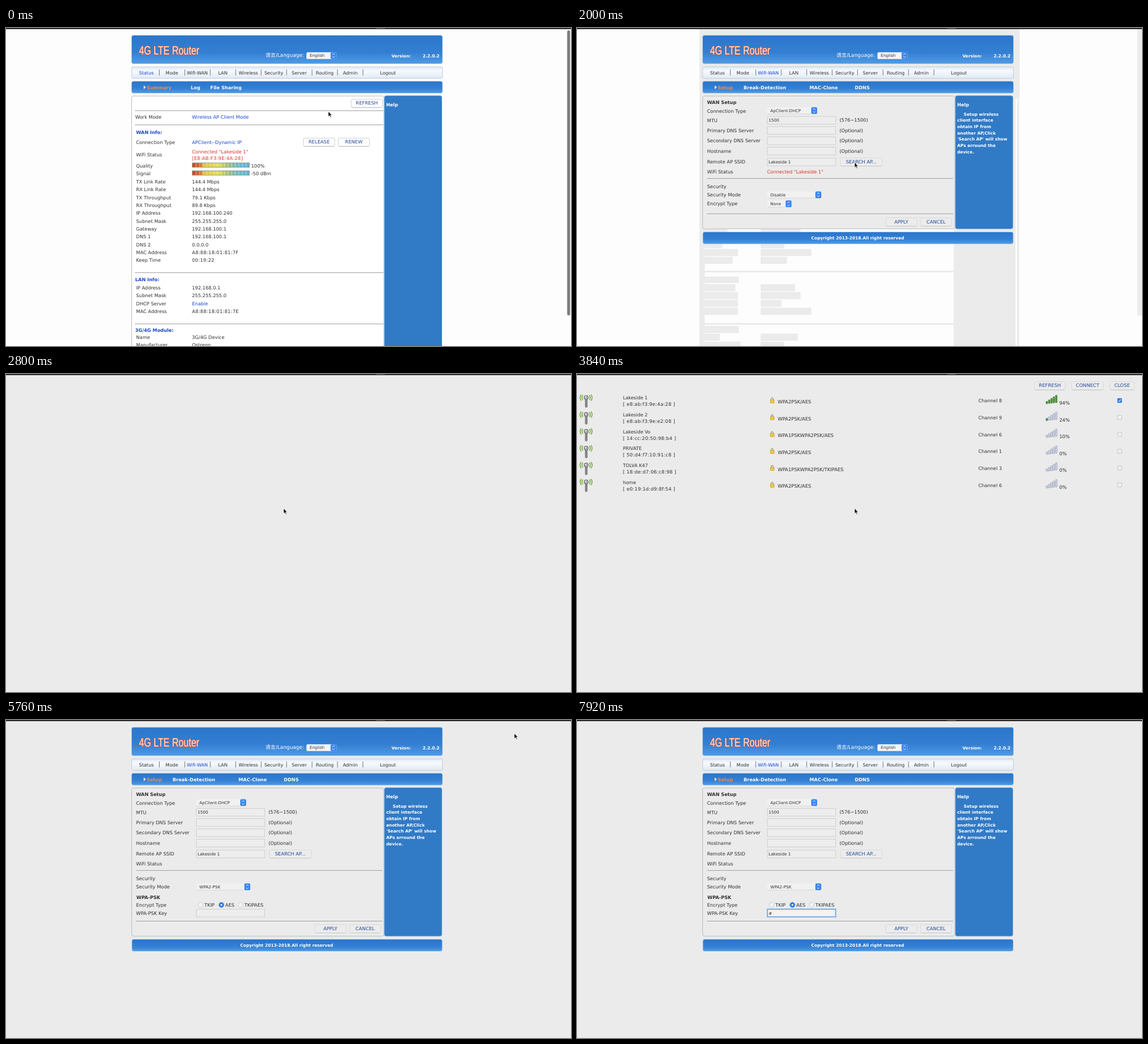
An HTML page that plays this animation: 960 px wide and 540 px high, repeating every 8 s.

```html
<!DOCTYPE html>
<html lang="en">
<head>
<meta charset="utf-8">
<title>Router setup</title>
<style>
html, body { margin: 0; width: 100%; height: 100%; overflow: hidden; background: #fdfdfd; }
svg { display: block; width: 960px; height: 540px; }
text { font-family: "DejaVu Sans", "Noto Sans CJK SC", "Noto Sans CJK", sans-serif; fill: #303030; white-space: pre; text-rendering: geometricPrecision; }
.b { font-weight: 700; }
.white { fill: #fff; }
.blue { fill: #1745d6; }
.red { fill: #d8322a; }
.orange { fill: #f08a4c; }
.btn { fill: #20479a; }
.logo { font: 15.4px "Liberation Sans", Arial, sans-serif; fill: #fdebe2; stroke: #e4532f; stroke-width: 1.3px; paint-order: stroke; }

.scene { visibility: hidden; animation: 8s step-end infinite; }
#status { animation-name: status; }
#bare { animation-name: bare; }
#erased { animation-name: erased; }
#loaded { animation-name: loaded; }
#dark { animation-name: dark; }
#blank { animation-name: blank; }
#list { animation-name: list; }
#final { animation-name: final; }
#focus { animation-name: focus; }
#caret { animation-name: caret; }
#typed { animation-name: typed; }
#beam { animation-name: beam; }
#arrow { animation: move 8s ease-in-out infinite, arrow 8s step-end infinite; }

@keyframes status { 0% { visibility: visible } 12%, 100% { visibility: hidden } }
@keyframes erased { 0% { visibility: hidden } 12% { visibility: visible } 28%, 100% { visibility: hidden } }
@keyframes bare { 0% { visibility: hidden } 12% { visibility: visible } 15%, 100% { visibility: hidden } }
@keyframes loaded { 0% { visibility: hidden } 15% { visibility: visible } 28%, 100% { visibility: hidden } }
@keyframes dark { 0% { visibility: hidden } 28% { visibility: visible } 34.5%, 100% { visibility: hidden } }
@keyframes blank { 0% { visibility: hidden } 34.5%, 100% { visibility: visible } }
@keyframes list { 0% { visibility: hidden } 42% { visibility: visible } 66%, 100% { visibility: hidden } }
@keyframes final { 0% { visibility: hidden } 66%, 100% { visibility: visible } }
@keyframes focus { 0% { visibility: hidden } 83%, 100% { visibility: visible } }
@keyframes caret { 0% { visibility: hidden } 83% { visibility: visible } 89% { visibility: hidden } }
@keyframes typed { 0% { visibility: hidden } 94%, 100% { visibility: visible } }
@keyframes beam { 0% { visibility: hidden } 82% { visibility: visible } 94%, 100% { visibility: hidden } }
@keyframes arrow { 0% { visibility: visible } 82%, 100% { visibility: hidden } }
@keyframes move {
  0%, 1% { transform: translate(547px, 141px) }
  10%, 16% { transform: translate(323px, 70px) }
  23.5%, 48.7% { transform: translate(471px, 227.5px) }
  58.5%, 74.5% { transform: translate(863px, 22px) }
  82%, 100% { transform: translate(397px, 326px) }
}
</style>
</head>
<body>
<svg id="stage" viewBox="0 0 960 540" xmlns="http://www.w3.org/2000/svg"></svg>
<script>
const GREY = '#ebebeb';
const SSID = 'Lakeside 1';

const rect = (x, y, w, h, fill, more = '') =>
  `<rect x="${x}" y="${y}" width="${w}" height="${h}" fill="${fill}" ${more}/>`;
const path = (d, more) => `<path d="${d}" ${more}/>`;
const scene = (id, body) => `<g id="${id}" class="scene">${body}</g>`;

// y is the middle of the capital letters; hex addresses are set a little wider
function text(x, y, s, cls = '', size = 8, anchor = 'start') {
  const gap = /:.*:/.test(s) ? ' letter-spacing=".28"' : '';
  return `<text x="${x}" y="${y + size * .36}" font-size="${size}" text-anchor="${anchor}" class="${cls}"${gap}>${s}</text>`;
}
const rule = (x, y, w) => rect(x, y, w, 1, '#a3a3a3');

function button(x, y, w, label, fill) {
  const edge = fill === '#fff' ? '#c9cfd8' : '#d9d9d9';
  return rect(x + .5, y - 6.5, w - 1, 14, fill, `rx="2" stroke="${edge}"`) +
    rect(x + 2, y + 7, w - 4, 1, '#c6c6c6') +
    text(x + w / 2, y, label, 'btn', 8.1, 'middle');
}
function select(x, y, w, label, fill = '#f1f1f1') {
  const sx = x + w - 10, cx = sx + 5;
  return rect(x, y - 5.5, w, 11.5, fill, 'rx="2"') + rect(x + 1, y + 5.5, w - 11, .7, '#cdcdcd') +
    text(x + 5.5, y, label, '', 7) +
    rect(sx, y - 5.5, 10, 11.5, '#3b84ee', 'rx="2"') +
    path(`M${cx - 2} ${y - 1.2}l2 -2 2 2M${cx - 2} ${y + 1.6}l2 2 2 -2`, 'fill="none" stroke="#fff"');
}
const input = (y, value = '') =>
  rect(323.5, y - 6.5, 116, 13, '#ededed', 'stroke="#d0d0d0"') + text(325.5, y, value, '', 7.1);

function nav(active) {
  const names = ['Status', 'Mode', 'Wifi-WAN', 'LAN', 'Wireless', 'Security', 'Server', 'Routing', 'Admin'];
  return names.map((n, i) =>
    text(238.5 + 43.3 * i, 75.7, n, i === active ? 'blue' : '', 7.85, 'middle') +
    rect(260 + 43.25 * i, 70.5, 1, 10, '#777')).join('') +
    text(649, 75.7, 'Logout', '', 7.85, 'middle');
}

function frame(active, tabs) {
  const bar = (y, h) => rect(213.5, y + .5, 528, h - 1, 'url(#bar)', 'rx="3" stroke="#8fb9e4" stroke-width=".8"');
  return bar(12, 49) +
    `<text class="logo" transform="translate(226 45) scale(1 1.33)">4G LTE Router</text>` +
    text(441, 46, '语言/Language:', 'white', 8.6) + select(510.5, 46.7, 51, 'English', '#f4f6f8') +
    text(655, 47, 'Version:', 'white b', 7.1) + text(708, 47, '2.2.0.2', 'white b', 7.3) +
    rect(213.5, 66, 528, 19.5, 'url(#nav)', 'rx="2" stroke="#b9cbe0" stroke-width=".9"') + nav(active) +
    bar(90, 21) + path('M234 97.8l3.6 3 -3.6 3z', 'fill="#fff"') +
    tabs.map(([x, s], i) => text(x, 101, s, i ? 'b white' : 'b orange', 7.9)).join('');
}
const panel = (h, fill) =>
  rect(213.5, 115.5, 428.5, h, fill, 'rx="3" stroke="#bdbdbd"') +
  rect(643, 115, 97.5, h + .5, '#317ac6', 'rx="3" stroke="#5f9cdb" stroke-width=".8"') +
  text(646, 130, 'Help', 'b white', 7.8);

const pitch = 13.36;
const rows = [
  ['Connection Type', 'APClient--Dynamic IP', 194, 'blue'],
  ['WiFi Status', '', 215.5],
  ['Quality', '', 234], ['Signal', '', 247.5],
  ...[['TX Link Rate', '144.4 Mbps'], ['RX Link Rate', '144.4 Mbps'], ['TX Throughput', '79.1 Kbps'],
    ['RX Throughput', '89.8 Kbps'], ['IP Address', '192.168.100.240'], ['Subnet Mask', '255.255.255.0'],
    ['Gateway', '192.168.100.1'], ['DNS 1', '192.168.100.1'], ['DNS 2', '0.0.0.0'],
    ['MAC Address', 'A8:88:18:01:81:7F'], ['Keep Time', '00:19:22']].map(([a, b], i) => [a, b, 261 + pitch * i]),
  ...[['IP Address', '192.168.0.1'], ['Subnet Mask', '255.255.255.0'], ['DHCP Server', 'Enable', 'blue'],
    ['MAC Address', 'A8:88:18:01:81:7E']].map(([a, b, c], i) => [a, b, 441 + pitch * i, c]),
  ['Name', '3G/4G Device', 525], ['Manufacturer', 'Ostrenn', 538.5]
];

function meter(y, label) {
  let s = rect(316.5, y - 5, 97, 7.5, 'url(#meter)', 'stroke="#8a9a8a" stroke-width=".9"');
  for (let i = 1; i < 16; i++) s += rect(316.5 + i * 6.06, y - 4.5, .9, 6.5, '#fff', 'opacity=".6"');
  return s + text(416.5, y, label);
}

function statusPage() {
  return rect(0, 0, 960, 540, '#fdfdfd') +
    frame(0, [[239, 'Summary'], [314, 'Log'], [347, 'File Sharing']]) + panel(440, '#fff') +
    button(586, 127.5, 54, 'REFRESH', '#fff') +
    [140, 164, 415, 502].map(y => rule(219, y, 422)).join('') +
    text(219.5, 151, 'Work Mode') + text(316, 151, 'Wireless AP Client Mode', 'blue') +
    text(221, 177.5, 'WAN Info:', 'b blue', 7.9) +
    text(219.5, 427.5, 'LAN Info:', 'b blue', 7.9) + text(219.5, 513, '3G/4G Module:', 'b blue', 7.9) +
    rows.map(([a, b, y, c]) => text(221, y, a) + text(316, y, b, c)).join('') +
    button(505, 193.5, 54, 'RELEASE', '#fff') + button(564, 193.5, 54, 'RENEW', '#fff') +
    text(316, 210.5, `Connected "${SSID}"`, 'red') + text(316, 221, '[E8:AB:F3:9E:4A:28]', 'red') +
    meter(234, '100%') + meter(247.5, '-50 dBm') +
    rect(953.5, 4, 5, 484, '#7b7b7b', 'rx="2.5"');
}

// Grey that replaces the old page where it had ink
function erasedPage() {
  const patch = (x, y, w, h) => rect(x, y, w, h, GREY);
  return rect(0, 0, 960, 540, '#fdfdfd') +
    patch(208, 2, 544, 118) + patch(208, 120, 9, 420) + patch(640, 120, 105, 420) + patch(748, 120, 3, 420) +
    patch(952, 2, 8, 486) +
    patch(585, 119, 55, 18) + patch(537, 137, 23, 21) + patch(505, 185, 118, 20) + patch(312, 205, 143, 48) +
    patch(323, 128, 92, 31) + patch(217, 422, 58, 11) + patch(217, 506, 58, 12) +
    [139, 163, 412, 501].map(y => patch(217, y, 423, 3)).join('') +
    rows.map(([a, b, y]) => patch(217, y - 6, a.length * 4.4 + 8, 12) +
      (b && patch(312, y - 6, b.length * 4.6 + 8, 12))).join('');
}

function formTop(ssid, mtu) {
  const labels = [['Connection Type', 141], ['MTU', 157], ['Primary DNS Server', 174], ['Secondary DNS Server', 191.5],
    ['Hostname', 209], ['Remote AP SSID', 227.5], ['WiFi Status', 244], ['Security', 269], ['Security Mode', 283.5]];
  return text(221, 126.5, 'WAN Setup', 'b', 7.9) + labels.map(([s, y]) => text(221, y, s)).join('') +
    select(323, 140, 85, 'ApClient-DHCP') +
    input(156.7, mtu) + input(174) + input(191.5) + input(209) + input(227.5, ssid) +
    text(446, 156.5, '(576~1500)') + [174, 191.5, 209].map(y => text(446, y, '(Optional)')).join('') +
    button(447, 227, 72, 'SEARCH AP...', '#ececec') + rule(221, 255, 418);
}
const formEnd = (line, y) => rule(221, line, 418) +
  button(524, y, 54, 'APPLY', '#ececec') + button(583, y, 54, 'CANCEL', '#ececec');

const openForm = (ssid, mtu) => formTop(ssid, mtu) +
  text(323, 244, `Connected "${SSID}"`, 'red') + select(323, 283, 92, 'Disable') +
  text(221, 298.5, 'Encrypt Type') + select(323, 298.3, 41.5, 'None') + formEnd(315, 329);

const radio = (x, label, on) =>
  `<circle cx="${x}" cy="314" r="4.2" fill="${on ? '#2f7be8' : '#f3f3f3'}" stroke="${on ? '#2f7be8' : '#c2c2c2'}" stroke-width=".8"/>` +
  (on ? `<circle cx="${x}" cy="314" r="1.5" fill="#fff"/>` : '') + text(x + 6.5, 314, label);

const securedForm = () => formTop(SSID, '1500') + select(323, 283, 92, 'WPA2-PSK') +
  text(221.5, 301, 'WPA-PSK', 'b', 7.9) + text(221, 314, 'Encrypt Type') + text(221, 328, 'WPA-PSK Key') +
  radio(330.5, 'TKIP') + radio(366, 'AES', true) + radio(398.5, 'TKIPAES') + input(327.7) + formEnd(341, 354);

const tabs = [[239, 'Setup'], [283, 'Break-Detection'], [395, 'MAC-Clone'], [472, 'DDNS']];
const help = ['Setup wireless', 'client interface', 'obtain IP from', 'another AP,Click',
  "'Search AP' will show", 'APs arround the', 'device.'];
const setupPage = (h, form) => frame(2, tabs) + panel(h, GREY) +
  help.map((s, i) => text(i ? 646 : 657, 146 + 10.7 * i, s, 'b white', 7.15)).join('') + form +
  rect(214, 121 + h, 527, 20, 'url(#bar)', 'rx="3" stroke="#8fb9e4" stroke-width=".8"') +
  text(477, 131.3 + h, 'Copyright 2013-2018.All right reserved', 'b white', 7.15, 'middle');

const barePage = () => select(510.5, 46.7, 51, 'English') + nav(2) + text(234, 101, 'Setup', 'b orange', 7.9) + openForm();

function network([ssid, mac, cipher, channel, power], i) {
  const filled = Math.floor(power / 20 + .4);
  let bars = '';
  for (let k = 0; k < 5; k++) {
    const h = 4 + k * 2.1;
    bars += rect(797 + k * 4, 50.5 - k * .5 - h, 2.7, h, k < filled ? '#4f9a3a' : '#d3dcf0',
      `rx=".6" stroke="${k < filled ? '#39702b' : '#8790a5'}" stroke-width=".7"`);
  }
  const box = i
    ? rect(918.5, 41.7, 7, 7, '#f0f0f0', 'rx="1.5" stroke="#c4c4c4"')
    : rect(918, 41, 8, 8, '#3380f0', 'rx="1.5"') + path('M920 45l1.6 1.8 2.6 -3.8', 'fill="none" stroke="#fff"');
  return `<g transform="translate(0 ${28.65 * i})">` +
    path('M10 36q-3 4 0 8M7.3 35q-4 5 0 10.5M21 36q3 4 0 8M23.7 35q4 5 0 10.5', 'fill="none" stroke="#77ad3c" stroke-width="1.6"') +
    rect(14, 42, 3.4, 14.5, '#85878c', 'rx="1.2" stroke="#65676c" stroke-width=".6"') +
    '<circle cx="15.6" cy="40" r="3.6" fill="#a9abb2" stroke="#63656b"/><circle cx="14.8" cy="39" r="1.2" fill="#e2e3e8"/>' +
    text(78, 40.5, ssid, '', 7.9) + text(78, 51.5, `[ ${mac} ]`) +
    path('M329.8 44v-2q1.7 -3 3.5 0v2', 'fill="none" stroke="#8f8a76" stroke-width="1.1"') +
    rect(328.5, 43.8, 6.6, 5.4, '#f0c93c', 'rx=".8" stroke="#b08d24" stroke-width=".6"') +
    text(341, 47, cipher, '', 8.1) + text(682, 45.6, 'Channel ' + channel, '', 7.9) +
    bars + text(819.5, 49, power + '%') + box + '</g>';
}
const networks = [
  [SSID, 'e8:ab:f3:9e:4a:28', 'WPA2PSK/AES', 8, 94],
  ['Lakeside 2', 'e8:ab:f3:9e:e2:08', 'WPA2PSK/AES', 9, 24],
  ['Lakeside Vo', '14:cc:20:50:98:b4', 'WPA1PSKWPA2PSK/AES', 6, 10],
  ['PRIVATE', '50:d4:f7:10:91:c8', 'WPA2PSK/AES', 1, 0],
  ['TOLVA K47', '18:de:d7:06:c8:98', 'WPA1PSKWPA2PSK/TKIPAES', 3, 0],
  ['home', 'e0:19:1d:d9:8f:54', 'WPA2PSK/AES', 6, 0]
];
const listPage = () => button(777, 19.5, 53, 'REFRESH', '#ececec') + button(840, 19.5, 55, 'CONNECT', '#ececec') +
  button(905, 19.5, 42.5, 'CLOSE', '#ececec') + networks.map(network).join('');

const gradient = (id, stops, dir) => `<linearGradient id="${id}" x2="${dir ? 0 : 1}" y2="${dir ? 1 : 0}">` +
  stops.map(([o, c]) => `<stop offset="${o}" stop-color="${c}"/>`).join('') + '</linearGradient>';

document.getElementById('stage').innerHTML = '<defs>' +
  gradient('bar', [[0, '#2a76cb'], [.6, '#347fd2'], [1, '#4f9be5']], true) +
  gradient('nav', [[0, '#dfeaf6'], [.35, '#f7f9fc'], [1, '#e0eaf6']], true) +
  gradient('meter', [[0, '#c4452f'], [.14, '#cc6a38'], [.2, '#dfc04a'], [.45, '#e3dc58'], [.62, '#a5bf74'], [.78, '#6fb9c4'], [1, '#5fb0dc']]) +
  '</defs>' +
  scene('status', statusPage()) +
  scene('erased', erasedPage()) +
  scene('bare', barePage()) +
  scene('loaded', setupPage(225.5, openForm(SSID, '1500'))) +
  scene('dark', rect(0, 0, 960, 540, '#1e0f33')) +
  scene('blank', rect(0, 0, 960, 540, GREY)) +
  scene('list', listPage()) +
  scene('final', setupPage(251.5, securedForm())) +
  scene('focus', rect(323.5, 321.3, 116, 13, '#f0f2f4', 'stroke="#62a3e0" stroke-width="1.6"')) +
  scene('caret', rect(325.5, 323, .9, 9.5, '#333')) +
  scene('typed', text(325.5, 328, '#', '', 7.1)) +
  rect(0, 0, 960, 2, '#2b2a2d') + rect(629, 0, 15, 1, '#6d6d70') +
  scene('beam', path('M395.3 326.5q2.2 0 2.2 1.5v6.5q0 1.5 -2.2 1.5M399.7 326.5q-2.2 0 -2.2 1.5v6.5q0 1.5 2.2 1.5', 'fill="none" stroke="#333" stroke-width=".9"')) +
  `<g id="arrow">${path('M.5 .5V9.7L2.6 7.8 4.1 11 5.7 10.3 4.2 7.2H7Z', 'fill="#111" stroke="#fff" stroke-width=".8"')}</g>`;
</script>
</body>
</html>
```
